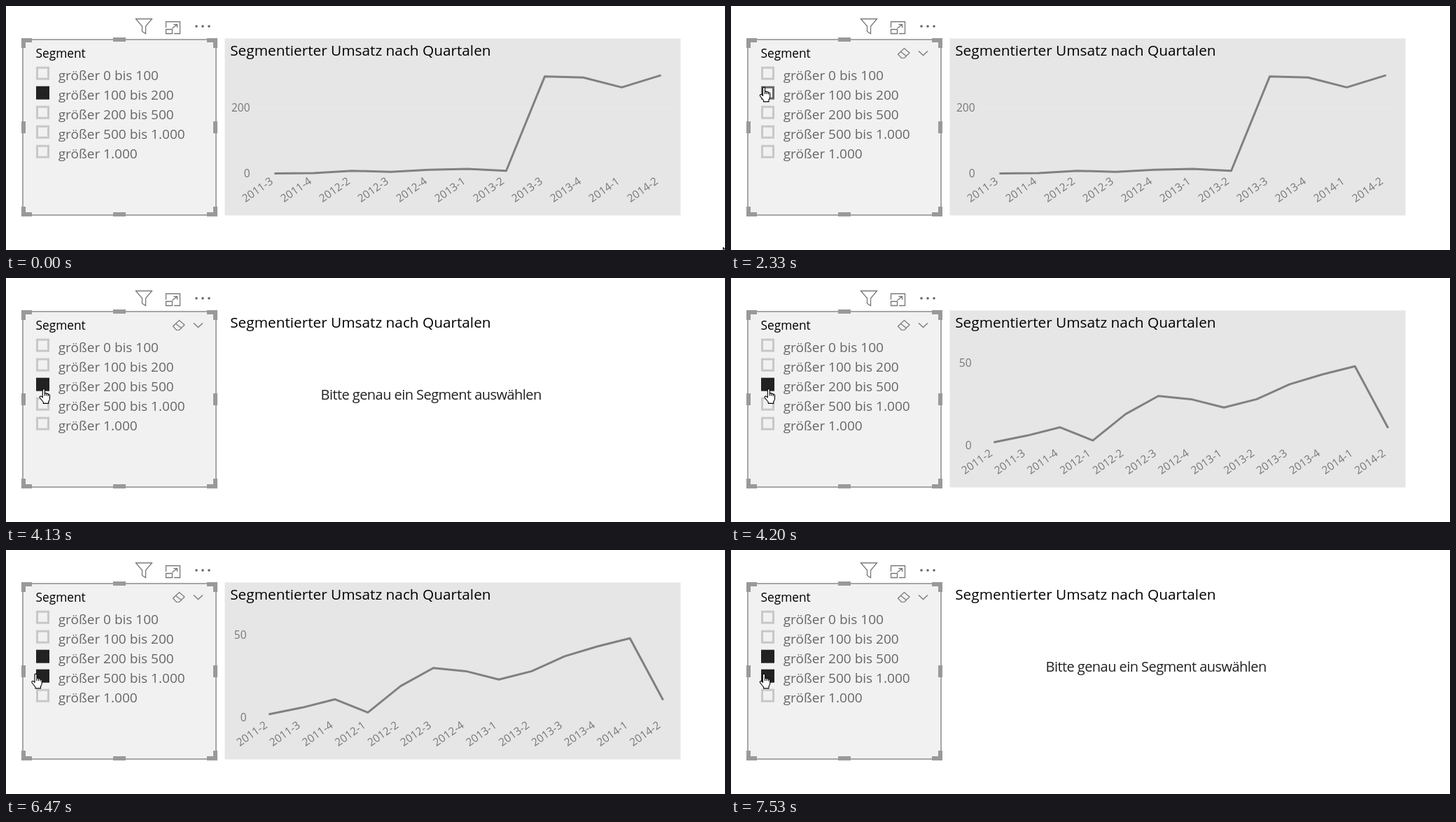
Write an HTML page that moves like this. It is 1027 by 349 pixels and loops after 8000 ms.

```html
<!DOCTYPE html>
<html lang="de">
<head>
<meta charset="utf-8">
<style>
  html, body { margin: 0; width: 100%; height: 100%; overflow: hidden; background: #fff; }
  svg { display: block; font-family: "Open Sans", "Noto Sans", sans-serif; }
  .icon { fill: none; stroke: #777; stroke-width: 1.3; }
  .handle { fill: none; stroke: #999; stroke-width: 6; }
  .row { font-size: 19px; fill: #666; }
  .axis { font-size: 15.5px; fill: #777; text-anchor: end; }
  .line { fill: none; stroke: #808080; stroke-width: 3; stroke-linejoin: round; stroke-linecap: round; }
  .cursor { fill: #fff; stroke: #000; stroke-width: 1.1; stroke-linejoin: round; }
</style>
</head>
<body>
<svg width="1027" height="349" viewBox="0 0 1027 349">
  <g class="icon">
    <path d="M185.5 18.5H208.5L199.5 29V39.5L194.5 36.5V29Z"/>
    <path d="M228.5 31V22.5H248.5V39.5H240M228.5 33.5H237.5V39.5H228.5ZM237.5 32L244.5 26.5M239.5 26.5H244.5V31"/>
  </g>
  <g fill="#666"><circle cx="272" cy="29" r="1.8"/><circle cx="281" cy="29" r="1.8"/><circle cx="290" cy="29" r="1.8"/></g>

  <rect x="24" y="48" width="276" height="251" fill="#f1f1f1" stroke="#a6a6a6" stroke-width="2"/>
  <path class="handle" d="M37 49H25V60M287 49H299V60M37 298H25V287M287 298H299V287
    M153 48H171M153 298H171M25 165V182M299 165V182"/>
  <text x="42.5" y="74" font-size="17.3">Segment</text>
  <g id="tools" class="icon">
    <path d="M238.5 69L247.5 60.5L255 67L247.5 74.5H243.5ZM242.5 65.5L251 72" stroke-width="1.2"/>
    <path d="M268 64.5L274.5 70.5L281 64.5"/>
  </g>
  <g id="rows"></g>

  <g id="charts"><rect x="312.5" y="46.5" width="651" height="253" fill="#e6e6e6"/></g>
  <text x="320.2" y="71" font-size="20.8">Segmentierter Umsatz nach Quartalen</text>
  <text id="hint" x="449.5" y="174" font-size="20" letter-spacing="-.55" fill="#222">Bitte genau ein Segment auswählen</text>

  <path id="arrow" class="cursor" d="M.5 .5V16.5L4.2 13L6.8 19L9.2 18L6.7 12.2H11.8Z"/>
  <path id="hand" class="cursor" d="M5 13V2Q5 .6 6.5 .6Q8 .6 8 2V7Q10 6 10.5 7.5Q12.5 6.8 13 8.4
    Q15.2 8 15.2 10V14.5Q15 17 13.5 18.5V21.4H6V19.5L1.2 13.5Q.2 11.5 2 11Q3.5 10.8 5 13Z
    M8 7V10.5M10.5 7.5V10.5M13 8.4V11"/>
</svg>
<script>
const $ = id => document.getElementById(id);
const FPS = 15, LOOP = 8000;

function add(parent, tag, attrs, text = "") {
  const el = document.createElementNS("http://www.w3.org/2000/svg", tag);
  for (const k in attrs) el.setAttribute(k, attrs[k]);
  el.textContent = text;
  return parent.appendChild(el);
}

const show = (el, on) => el.setAttribute("visibility", on ? "visible" : "hidden");
const place = (el, x, y) => el.setAttribute("transform", `translate(${x} ${y})`);

const boxes = ["0 bis 100", "100 bis 200", "200 bis 500", "500 bis 1.000", "1.000"].map((label, i) => {
  add($("rows"), "text", { class: "row", x: 74.7, y: 105.7 + 28 * i }, "größer " + label);
  return add($("rows"), "rect", { x: 44.5, y: 88.2 + 28 * i, width: 16, height: 16, "stroke-width": 3 });
});

function chart({ x0, x1, tick, tickY, axisX, quarters, values }) {
  const g = add($("charts"), "g", {}), zero = 239.5;
  const step = (x1 - x0) / (values.length - 1);
  const yOf = v => zero - v / tick * (zero - tickY);
  add(g, "path", { d: `M${axisX + 10} ${tickY}H952`, stroke: "#e9e9e9" });
  for (const v of [0, tick]) add(g, "text", { class: "axis", x: axisX, y: yOf(v) + 5.5 }, v);
  quarters.forEach((q, i) => add(g, "text",
    { class: "axis", transform: `translate(${x0 + i * step - 2} 253) rotate(-35)` }, q));
  add(g, "polyline", { class: "line", points: values.map((v, i) => [x0 + i * step, yOf(v)]).join(" ") });
  return g;
}

const allQuarters = [];
for (let y = 2011; y < 2015; y++) for (let q = 1; q < 5; q++) allQuarters.push(y + "-" + q);
const quarters = allQuarters.slice(1, 14);

const first = chart({
  x0: 384.5, x1: 934.5, tick: 200, tickY: 145.5, axisX: 348.5,
  quarters: quarters.filter(q => q != "2011-2" && q != "2012-1"),
  values: [0, 1, 8, 5, 11, 14, 8, 295, 292, 262, 298]
});
const second = chart({
  x0: 376.5, x1: 938, tick: 50, tickY: 121.5, axisX: 343.5, quarters,
  values: [2, 6, 11, 3, 19, 30, 28, 23, 28, 37, 43, 48, 11]
});

// Pointer keys: step, x, y
const path = [
  [14, 150, 281], [20, 88, 205], [26, 36, 116], [27, 40.5, 115.5], [45, 40.5, 115.5],
  [47, 43, 152], [58, 43, 152], [59, 45, 157], [60, 45, 157], [61, 47.3, 158], [66, 47.3, 158],
  [69, 40, 198], [83, 40, 198], [92, 36, 176.5], [108, 36, 176.5], [109, 39, 176.5],
  [112, 39, 176.5], [113, 40.5, 176.5], [121, 40.5, 176.5]
];

function pointer(n) {
  if (n < 3) return [1024, 345];
  if (n < 4) return [1017, 346];
  if (n < path[0][0]) return [-50, -50];
  const i = path.findIndex(k => k[0] > n);
  const [a, ax, ay] = path[i - 1], [b, bx, by] = path[i];
  const p = (n - a) / (b - a);
  return [ax + (bx - ax) * p, ay + (by - ay) * p];
}

function draw(now) {
  const n = Math.floor((now % LOOP + 5) * FPS / 1000);
  const [x, y] = pointer(n);
  const hover = x < 300 ? Math.floor((y - 83) / 28) : -1;
  const onRow = hover >= 0 && hover < 5;
  const selected = [false, n < 35, n >= 61, n >= 96, false];

  boxes.forEach((box, i) => {
    box.setAttribute("fill", selected[i] ? "#222" : "#f1f1f1");
    box.setAttribute("stroke", selected[i] ? "#222" : i == hover ? "#666" : "#c8c8c8");
  });

  const isFirst = n < 36, isSecond = n >= 63 && n < 98;
  show($("charts"), isFirst || isSecond);
  first.style.display = isFirst ? "" : "none";
  second.style.display = isSecond ? "" : "none";
  show($("hint"), !isFirst && !isSecond);
  show($("tools"), n >= 14);

  show($("hand"), onRow);
  show($("arrow"), !onRow);
  place($("hand"), x, y);
  place($("arrow"), x, y);
  requestAnimationFrame(() => draw(performance.now() - start));
}

const start = performance.now();
draw(0);
</script>
</body>
</html>
```
